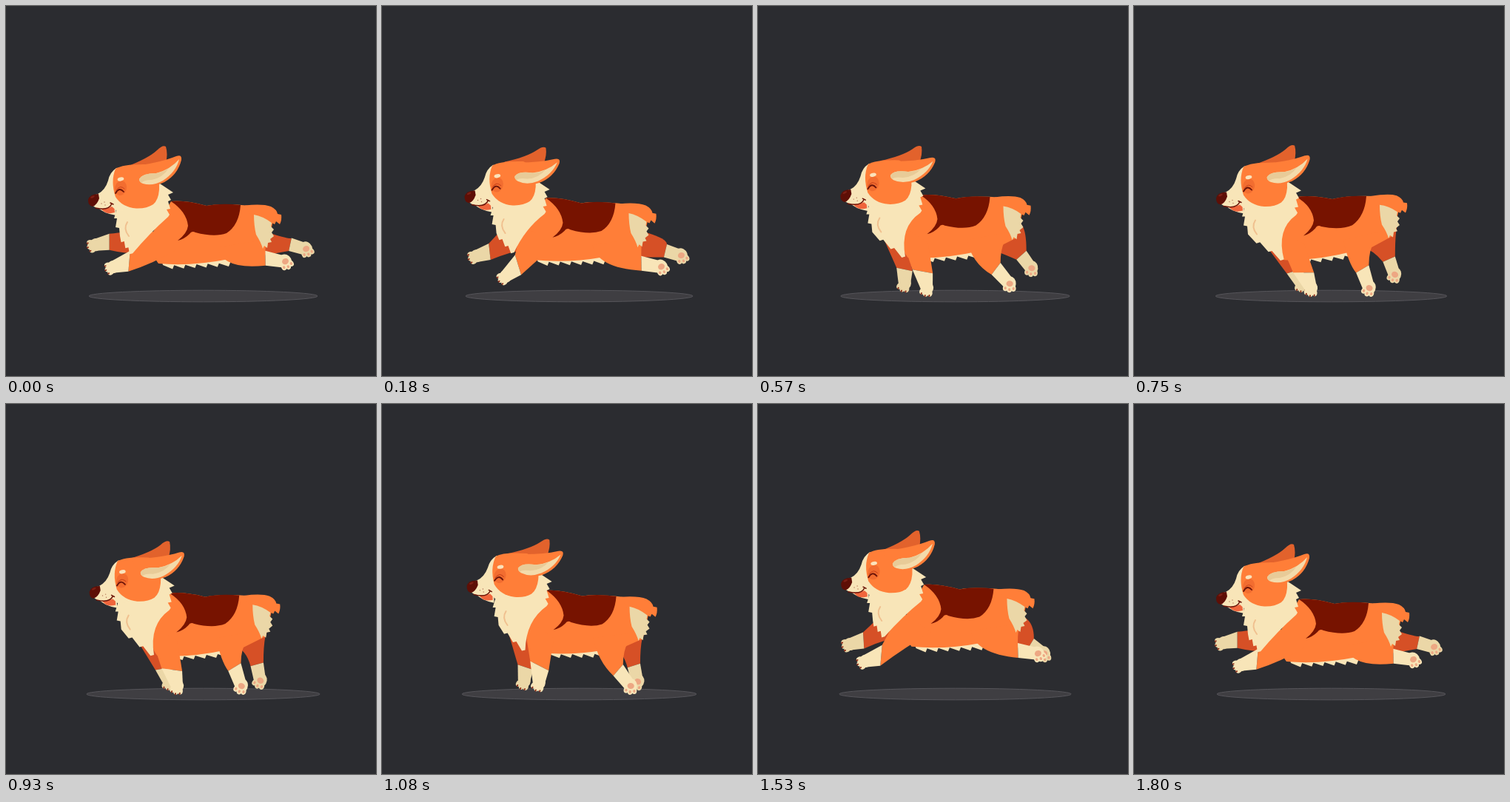
An HTML page with a canvas for the animation above (1.83 s loop, 500 by 500 pixels).

```html
<!DOCTYPE html>
<html>
<head>
<meta charset="utf-8">
<title>Running corgi</title>
<style>
html, body { margin: 0; width: 100%; height: 100%; overflow: hidden; background: #2b2c30; }
canvas { display: block; }
</style>
</head>
<body>
<canvas id="stage" width="500" height="500"></canvas>
<script>
const ctx = document.getElementById('stage').getContext('2d');
const ORANGE = '#ff7e38', RUST = '#d65026', CREAM = '#f8e5b8', TAN = '#ebd7a7', DARK = '#771300';
const CYCLE = 1800, LOOP = 1830, STEP = 30;

// Key poses of the bounce: time, shoulder y, rump y, head y, head tilt, ear tilt.
const BOUNCE = [
  [0, 0, 0, 0, 0, 0], [360, -11, -7, -9.5, 1, 14], [750, -6, -14, -2.5, 0, 2],
  [1080, -12, -8, -12, 3, 6], [1320, -20, -9, -23, 5, 12], [1530, -20, -19, -18, 1, -1]];

// Each paw follows waves in x and y and stops at the floor; lean is the mean shank angle.
const NEAR_FRONT = { x: [189, -45, 23], y: [372, -19, 16], floor: 382, lean: 115, sock: 24, half: 14, tilt: 25 };
const FAR_FRONT = { x: [163, -52, 16, 9, -7], y: [357, -34, 15], floor: 376, lean: 125, sock: 20, half: 11, tilt: 12 };
const NEAR_HIND = { x: [356, 31, -7, -9, 4], y: [364, -25, 9, 7, 2], floor: 382, lean: 33, sock: 28, half: 10, tilt: -12, hind: true };
const FAR_HIND = { x: [375, 31, 8], y: [353, -22, -4, -2, 6], floor: 376, lean: 48, sock: 23, half: 9, tilt: -5, hind: true };

const rad = deg => deg * Math.PI / 180;

// Mean plus first and second harmonics of the gallop.
function wave(t, [mean, c1, s1, c2 = 0, s2 = 0]) {
  const a = t / CYCLE * 2 * Math.PI;
  return mean + c1 * Math.cos(a) + s1 * Math.sin(a) + c2 * Math.cos(2 * a) + s2 * Math.sin(2 * a);
}

// Smooth periodic curve through the bounce poses.
function bounce(t) {
  const n = BOUNCE.length;
  const row = i => BOUNCE[(i + n) % n];
  const time = i => row(i)[0] + CYCLE * Math.floor(i / n);
  let i = n - 1;
  while (time(i) > t) i--;
  const span = time(i + 1) - time(i), u = (t - time(i)) / span;
  return row(i).slice(1).map((p, j) => {
    const k = j + 1, q = row(i + 1)[k];
    const m = (q - row(i - 1)[k]) / (time(i + 1) - time(i - 1)) * span;
    const w = (row(i + 2)[k] - p) / (time(i + 2) - time(i)) * span;
    const a = 2 * p - 2 * q + m + w, b = 3 * q - 3 * p - 2 * m - w;
    return ((a * u + b) * u + m) * u + p;
  });
}

function fill(path, color) {
  ctx.fillStyle = color;
  ctx.fill(new Path2D(path));
}

function line(path, color, width) {
  ctx.strokeStyle = color;
  ctx.lineWidth = width;
  ctx.lineCap = 'round';
  ctx.stroke(new Path2D(path));
}

function oval(x, y, rx, ry, color, angle = 0) {
  ctx.fillStyle = color;
  ctx.beginPath();
  ctx.ellipse(x, y, rx, ry, rad(angle), 0, 7);
  ctx.fill();
}

// Draw inside a frame turned about (x, y) and moved by (dx, dy).
function turned(x, y, angle, dx, dy, part) {
  ctx.save();
  ctx.translate(x + dx, y + dy);
  ctx.rotate(rad(angle));
  ctx.translate(-x, -y);
  part();
  ctx.restore();
}

// Row of fur teeth from one point to another.
function teeth(x0, y0, x1, y1, count, height) {
  const dx = (x1 - x0) / count, dy = (y1 - y0) / count, k = height / Math.hypot(dx, dy);
  let path = '';
  for (let i = 0; i < count; i++) {
    path += `L${x0 + dx * (i + .85) - dy * k} ${y0 + dy * (i + .85) + dx * k}`;
    path += `L${x0 + dx * (i + 1)} ${y0 + dy * (i + 1)}`;
  }
  return path;
}

function paw(hind, color) {
  oval(-1, 0, hind ? 10 : 9, 8.5, color);
  for (const s of [-5.5, 0, 5.5]) {
    const reach = 7 - Math.abs(s) * .3;
    oval(reach, s, 4, 3.4, color);
    if (hind) oval(reach, s, 2, 1.6, '#eda783');
    else oval(reach + 3, s, 1.6, 1, '#8a2a18');
  }
  if (hind) oval(-1, 0, 4, 4.6, '#eda783');
}

function leg(t, spec, rootA, rootB, fur, sock, ctrlA, drop) {
  const { hind, half } = spec;
  const x = wave(t, spec.x), y = Math.min(spec.floor, wave(t, spec.y));
  const angle = spec.lean + spec.x[0] - x;
  const ux = Math.cos(rad(angle)), uy = Math.sin(rad(angle));
  const across = rad(angle - 90 + spec.tilt);
  const mx = x - ux * spec.sock, my = y - uy * spec.sock;
  const ex = Math.cos(across) * half, ey = Math.sin(across) * half;
  const a = [mx - ex, my - ey], b = [mx + ex, my + ey];
  const ctrlB = [hind ? b[0] : (rootB[0] + b[0]) / 2, rootB[1] + drop];
  fill(`M${rootA}Q${ctrlA || rootA} ${a}L${b}Q${ctrlB} ${rootB}Z`, fur);
  fill(`M${a}L${x - uy * 8} ${y + ux * 8}L${x + uy * 8} ${y - ux * 8}L${b}Z`, sock);
  turned(0, 0, hind ? 52 + angle * .85 : 60 + angle * .6, x, y, () => paw(hind, sock));
}

function torso() {
  fill('M208 338L211 350' + teeth(211, 351, 302, 347, 6, 5) + 'L302 336Z', CREAM);
  fill('M222 264Q240 262 270 270Q290 266 330 270L360 290L352 325L310 345L300 342Q250 352 205 348Q195 335 195 310Z', ORANGE);
  fill('M322 269.5Q346 267 357 271Q365 275 366 281L371 282Q372 289 369 295L364 291L362 295Q350 288 334 290Z', ORANGE);
  fill('M222 264Q240 262 270 270Q290 266 316 269Q314 296 297 307Q281 313 255 306Q250 303 247 308Q240 315 231 317Q244 307 245 297Q243 278 222 264Z', DARK);
}

function rumpFur() {
  fill('M334 282Q346 284 358 293L357 298L361 302L358 306L361 311L356 315L358 319L353 320L352 327L348 324L346 328Q344 320 337 309Q334 297 334 282Z', TAN);
}

function chest(hx, hy, tx, ty, ctrl) {
  const at = (x, y) => `${x + hx} ${y + hy}`;
  const through = (...points) => points.map(p => 'L' + at(...p)).join('');
  fill('M' + at(150, 265) + through([150, 274], [146, 287], [150, 287], [148, 299], [153, 300], [154, 311]) +
    teeth(154 + hx, 310 + hy, tx, ty, 3, 4) + `Q${ctrl} ${at(219, 285)}` +
    through([221, 282], [217, 275], [222, 274], [219, 264], [223, 262], [219, 255], [226, 252], [208, 240]) + 'Z', CREAM);
  turned(0, 0, 0, hx, hy, () => line('M164 292Q158 301 166 311', '#f0c08f', 2));
}

function nearEar() {
  fill('M165 217Q205 213 230 203Q238 200 237 208Q232 228 214 238Q200 245 184 240Z', ORANGE);
  fill('M180 234Q184 226 203 226Q222 221 234 207Q230 224 212 236Q198 244 185 240Q180 238 180 234Z', '#f3dbab');
  fill('M180 234Q184 226 203 226Q214 224 220 219Q212 232 197 235Q186 235 183 239Q180 237 180 234Z', '#e8cb98');
}

function head(ear) {
  turned(178, 224, ear, 0, 0, () => fill('M163 217Q192 206 204 195Q212 187 216 190Q219 200 216 212L195 220Z', '#e2622c'));
  // mouth, muzzle and skull
  fill('M123 271Q130 280 149 283L148 266Z', CREAM);
  fill('M128 273Q134 283 147 279L146 268Z', '#ef653c');
  fill('M113 267Q111 258 124 254Q134 249 138 236Q140 225 149 219L200 225L206 250L175 274L150 277L143 271Q135 275 122 273Z', CREAM);
  fill('M148 220Q158 213.5 190 214Q208 222 207 248Q206 262 199 268Q190 274 176 273.5Q157 272 148 258Q141 237 148 220Z', ORANGE);
  line('M121 273Q139 277 143 267M141 266L145 268', '#6b1408', 1.5);
  fill('M125 254Q113 254 111 262Q111 270 117 271Q123 269 126 260Z', '#5e0f06');
  oval(117, 258, 3, 1.3, '#7d2015', -25);
  for (const [x, y] of [[129, 267], [133, 265], [134, 269]]) oval(x, y, .7, .7, '#b5765a');
  // eye
  oval(155, 246, 8, 10, '#f26d30', 15);
  line('M148 253Q153 244 159 251', '#6b1408', 1.9);
  line('M149 249Q154 241 160 247', '#c9441c', 1);
  oval(155, 234, 4.4, 2.5, '#fbe3bb', -12);
  turned(178, 224, ear, 0, 0, nearEar);
}

function draw(t) {
  const [shoulder, rump, headY, tilt, ear] = bounce(t);
  const dx = wave(t, [0, 1, -2.3]), headX = tilt * 1.2;
  const slope = (rump - shoulder) / 120;
  const body = (x, y) => [x + dx, y + shoulder + slope * (x - 225)];
  const inBody = part => {
    ctx.save();
    ctx.transform(1, slope, 0, 1, dx, shoulder - slope * 225);
    part();
    ctx.restore();
  };

  ctx.fillStyle = '#2b2c30';
  ctx.fillRect(0, 0, 500, 500);
  oval(266.5, 392, wave(t, [156, -1.5, -2]), 7.8, '#3f3e42');
  ctx.strokeStyle = '#56555a';
  ctx.lineWidth = 1;
  ctx.stroke();

  leg(t, FAR_HIND, body(310, 338), body(359, 308), RUST, TAN, body(325, 342), 8);
  leg(t, FAR_FRONT, body(165, 305), body(200, 333), RUST, TAN, null, 4);
  inBody(torso);
  leg(t, NEAR_HIND, body(285, 326), body(352, 315), ORANGE, CREAM, body(291, 357), 8);
  inBody(rumpFur);
  leg(t, NEAR_FRONT, body(190, 300), body(232, 328), ORANGE, CREAM, null, 20);

  // The chest tip is pulled along by the near front leg.
  const swing = wave(t, NEAR_FRONT.x) - NEAR_FRONT.x[0];
  chest(headX, headY, 186 + swing * .33, 341 + shoulder + swing * .15, body(194, 306));
  turned(190, 260, tilt, headX, headY, () => head(ear));
}

function tick() {
  const t = Math.floor(performance.now() % LOOP / STEP) * STEP;
  draw(t % CYCLE);
  requestAnimationFrame(tick);
}
tick();
</script>
</body>
</html>
```
